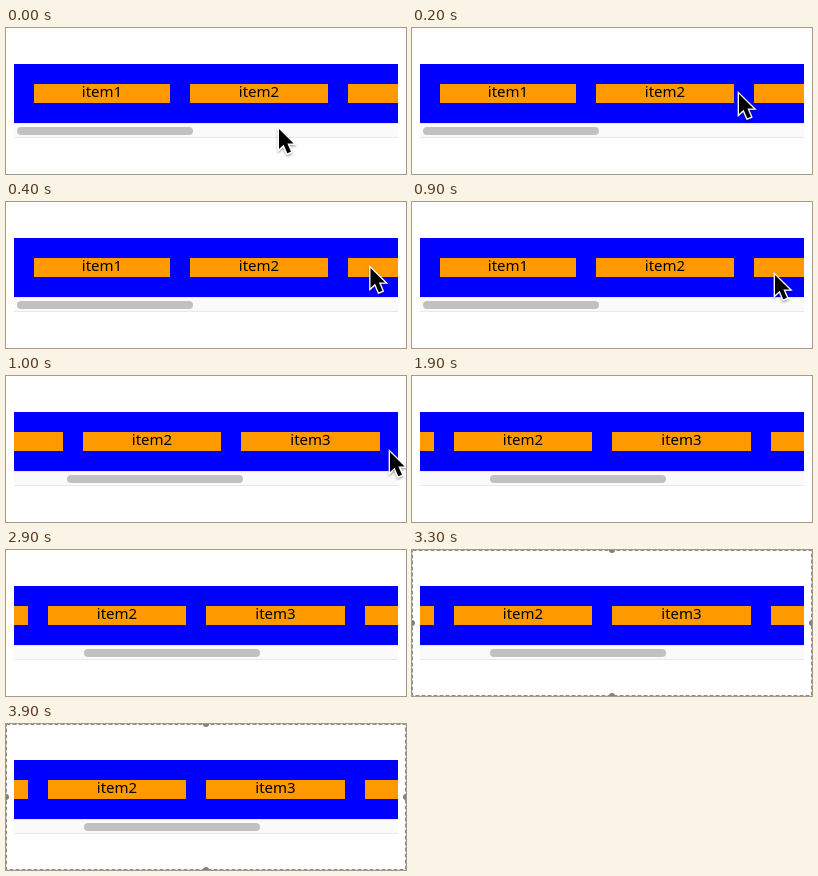
An HTML page that plays this animation: 400 px wide and 146 px high, repeating every 4600 ms.

```html
<!DOCTYPE html>
<html lang="en">
<head>
<meta charset="utf-8">
<title>Horizontal scroll</title>
<style>
  html, body { margin: 0; width: 100%; height: 100%; overflow: hidden; background: #fff; }
  svg { display: block; width: 100vw; height: 100vh; }
  text { font: 15px "Noto Sans", "Open Sans", sans-serif; text-anchor: middle; }
</style>
</head>
<body>
<svg viewBox="0 0 400 146">
  <defs>
    <clipPath id="view"><rect x="8" y="36" width="384" height="59"/></clipPath>
    <filter id="soft" x="-50%" y="-50%" width="200%" height="200%">
      <feDropShadow dx="0" dy="1.5" stdDeviation="1.2" flood-opacity=".4"/>
    </filter>
  </defs>
  <rect width="400" height="146" fill="#fff"/>
  <rect x="8" y="36" width="384" height="59" fill="#00f"/>
  <g clip-path="url(#view)"><g id="items"></g></g>
  <rect x="8" y="95" width="384" height="15" fill="#fafafa"/>
  <path d="M8 95.5H392M8 109.5H392" stroke="#e8e8e8"/>
  <rect id="thumb" x="11" y="99" width="176" height="8" rx="4" fill="#c1c1c1"/>
  <path id="cursor" d="M0 0V20L4.6 15.8L8.3 24.3L12 22.7L8.4 14.4H14.6Z"
        stroke="#fff" stroke-width="2.6" paint-order="stroke" filter="url(#soft)"/>
  <g id="frame">
    <rect x=".5" y=".5" width="399" height="145" fill="none" stroke="#8c8c8c" stroke-dasharray="4 2"/>
    <g id="handles" fill="#808080"></g>
  </g>
</svg>
<script>
const LOOP = 4600, STEP = 100, SCROLL = 142, THUMB = 67;
const $ = id => document.getElementById(id);

function add(parent, tag, attrs, label) {
  const el = document.createElementNS("http://www.w3.org/2000/svg", tag);
  for (const key in attrs) el.setAttribute(key, attrs[key]);
  if (label) el.textContent = label;
  parent.append(el);
}

[[28, 136], [184, 138], [342, 139], [501, 139]].forEach(([x, width], i) => {
  add($("items"), "rect", { x, y: 56, width, height: 19, fill: "#f90" });
  add($("items"), "text", { x: x + width / 2, y: 69 }, "item" + (i + 1));
});
for (const [cx, cy] of [[200, 0], [0, 73], [400, 73], [200, 146]])
  add($("handles"), "circle", { cx, cy, r: 3 });

// time, x, y of the pointer tip
const path = [
  [0, 273, 101], [100, 288, 91], [200, 327, 66], [300, 357, 50],
  [400, 364.5, 66], [500, 364, 71], [600, 363, 73], [900, 363, 73], [1000, 384, 76]
];

function pointer(t) {
  const i = Math.max(1, path.findIndex(p => p[0] >= t));
  const [t0, x0, y0] = path[i - 1], [t1, x1, y1] = path[i];
  const k = (t - t0) / (t1 - t0);
  return [x0 + (x1 - x0) * k, y0 + (y1 - y0) * k];
}

function scrollAt(t) {
  const k = Math.min(1, Math.max(0, (t - 900) / 200));
  return 1 - (1 - k) ** 2;
}

function show(id, on) {
  $(id).setAttribute("visibility", on ? "visible" : "hidden");
}

function draw(time) {
  // the picture holds between steps
  const t = Math.floor((time % LOOP) / STEP) * STEP;
  const k = scrollAt(t);
  $("items").setAttribute("transform", `translate(${-Math.round(SCROLL * k)})`);
  $("thumb").setAttribute("x", 11 + Math.round(THUMB * k));
  show("cursor", t <= 1000);
  if (t <= 1000) $("cursor").setAttribute("transform", `translate(${pointer(t)})`);
  show("frame", t >= 3000);
}

const start = performance.now();
function tick() {
  draw(performance.now() - start);
  requestAnimationFrame(tick);
}
tick();
</script>
</body>
</html>
```
